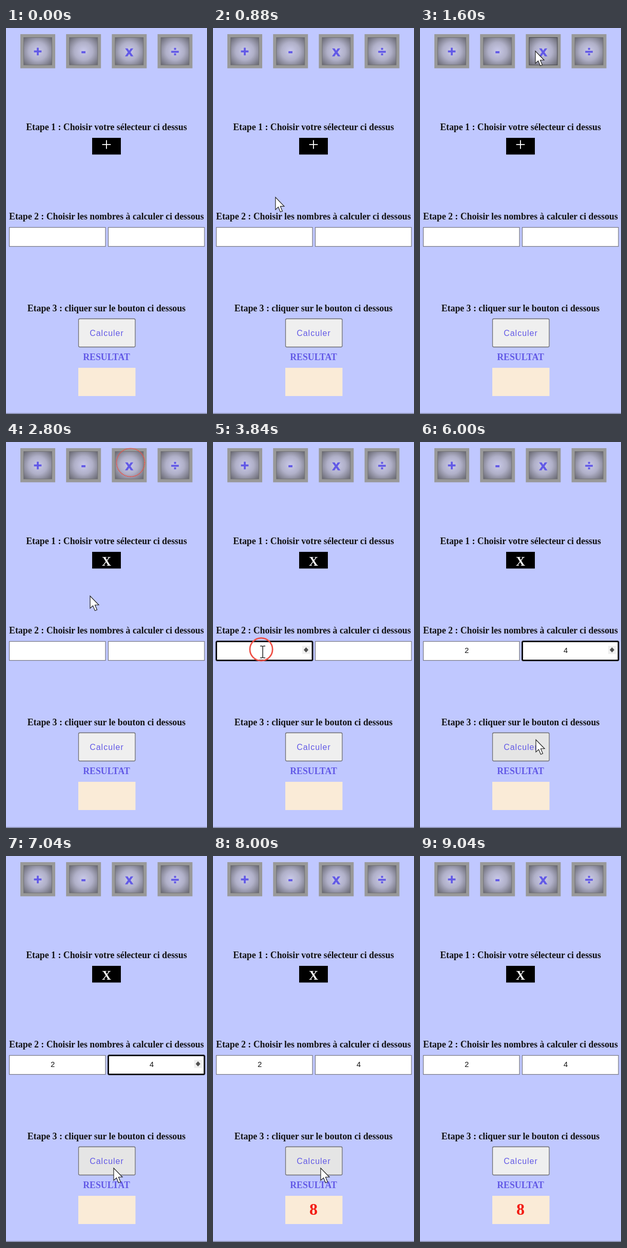
An HTML page that plays this animation: 392x752 px, repeating every 9.76 s.

```html
<!DOCTYPE html>
<html lang="fr">
<head>
<meta charset="utf-8">
<title>Calculatrice</title>
<style>
  html, body { margin: 0; width: 100%; height: 100%; overflow: hidden; background: #c0c8ff; }
  svg { display: block; }
  text { text-anchor: middle; }
  .step { font: bold 17.8px "Liberation Serif", serif; fill: #111; }
  .op { font: bold 28px "Liberation Sans", sans-serif; fill: #6259e6; stroke: #6259e6; stroke-width: .7; }
  .num { font: 14.8px "Liberation Sans", sans-serif; fill: #111; }
  .accent { fill: #6259e6; }
</style>
</head>
<body>
<svg width="392" height="752" viewBox="0 0 392 752">
  <defs>
    <radialGradient id="metal" r=".72">
      <stop offset="0" stop-color="#cacaea"/>
      <stop offset=".45" stop-color="#b0b0c8"/>
      <stop offset="1" stop-color="#62626a"/>
    </radialGradient>
  </defs>
  <rect width="392" height="752" fill="#c0c8ff"/>
  <path d="M0 751H392" stroke="#7b809c" stroke-width="1.5"/>
  <g id="keys"></g>

  <text class="step" x="196" y="199">Etape 1 : Choisir votre sélecteur ci dessus</text>
  <rect x="168" y="214" width="56" height="32.5"/>
  <text id="selector" x="196" fill="#fff"></text>

  <text class="step" x="196" y="373">Etape 2 : Choisir les nombres à calculer ci dessous</text>
  <g id="fields"></g>

  <text class="step" x="196" y="552">Etape 3 : cliquer sur le bouton ci dessous</text>
  <rect id="button" x="141.5" y="566.5" width="110.5" height="55" rx="2.5" stroke="#6d6d70" stroke-width="1.3"/>
  <text class="accent" x="196.5" y="600" style="font:16px 'Liberation Sans',sans-serif;letter-spacing:1px">Calculer</text>
  <text class="step accent" x="196" y="647" style="fill:#6259e6">RESULTAT</text>
  <rect x="141" y="662" width="111.5" height="55" fill="#faebd7"/>
  <text id="result" x="196" y="699" fill="#f3190f" style="font:bold 32px 'Liberation Serif',serif">8</text>

  <circle id="ring" fill="none" stroke="#ee4f45"/>
  <path id="arrow" d="M0 0V24L5.5 19L9.5 28.5L13.5 27L9.5 17.5H17Z" fill="#fff" stroke="#222" stroke-width="1.2"/>
  <path id="beam" d="M-5 -11.5H-1.5L0 -10.5L1.5 -11.5H5M0 -10.5V10.5M-5 11.5H-1.5L0 10.5L1.5 11.5H5" fill="none" stroke="#222" stroke-width="1.5"/>
</svg>
<script>
const LOOP = 9760, STEP = 80;
const $ = id => document.getElementById(id);
const show = (el, on) => el.style.display = on ? "" : "none";
const between = (t, a, b) => t >= a && t < b;

const set = (el, attrs) => {
  for (const name in attrs) el.setAttribute(name, attrs[name]);
};

$("keys").innerHTML = ["+", "-", "x", "÷"].map((sign, i) => `
  <g transform="translate(${28 + i * 89.2} 12)">
    <rect width="68" height="66.5" fill="#999"/>
    <rect class="face" x="6.5" y="6.5" width="55" height="53.5" fill="url(#metal)" stroke="#707074"/>
    <text class="op" x="34" y="43">${sign}</text>
  </g>`).join("");

$("fields").innerHTML = [6, 199].map((x, i) => `
  <g transform="translate(${x} 388)">
    <rect class="halo" x="-1" y="-1" width="190" height="40" rx="3" fill="#fff"/>
    <rect class="box" x=".5" y=".5" width="187.5" height="37" fill="#fff"/>
    <g class="spin"><path d="M168 9H183V25H168Z" fill="#efefef"/>
      <path d="M175.5 12L180 17L175.5 22L171 17Z" fill="#505050"/></g>
    <path class="caret" d="M85.5 10V26" stroke="#111" stroke-width="1.2"/>
    <text class="num" x="85" y="23">${[2, 4][i]}</text>
  </g>`).join("");

// Pointer path: time, x, y
const path = [
  [320, 60, 660], [1280, 166, 94], [1600, 225, 45], [1680, 225, 45], [1840, 242, 42],
  [2240, 242, 42], [2800, 164, 300], [3600, 96, 406], [3840, 97, 409], [4240, 97, 409],
  [4720, 293, 402], [5280, 293, 402], [6000, 226, 580], [6400, 210, 608],
  [8400, 210, 608], [8720, 252, 618], [9040, 252, 618]
];
// Clicks: start, end, x, y
const clicks = [[1760, 2880, 243, 40], [3760, 4160, 94, 404], [4720, 5040, 293, 402], [7440, 7920, 210, 608]];
// Fields: focus start, focus end, time of typing, hover start, hover end
const fields = [[3760, 4720, 4240, 3600, 4480], [4720, 7440, 5440, 4640, 5600]];

function pointer(t) {
  const i = path.findIndex(key => key[0] > t);
  const [t0, x0, y0] = path[i - 1], [t1, x1, y1] = path[i];
  const k = (t - t0) / (t1 - t0);
  return [x0 + (x1 - x0) * k, y0 + (y1 - y0) * k];
}

function draw(t) {
  const visible = between(t, 320, 9040);
  const [x, y] = visible ? pointer(t) : [-99, -99];
  const overField = y > 388 && y < 426 && (x < 194 || x > 199);
  show($("arrow"), visible && !overField);
  show($("beam"), visible && overField);
  for (const id of ["arrow", "beam"]) set($(id), { transform: `translate(${x} ${y})` });

  const hover = between(t, 1520, 2320);
  set(document.querySelectorAll(".face")[2], { stroke: hover ? "#44444a" : "#707074" });

  const chosen = t >= 1840;
  $("selector").textContent = chosen ? "X" : "+";
  $("selector").style.font = (chosen ? "bold 25px" : "36px") + " 'Liberation Serif',serif";
  set($("selector"), { y: chosen ? 240.5 : 239 });

  [...$("fields").children].forEach((field, i) => {
    const [focus, blur, typed, enter, leave] = fields[i];
    const part = name => field.querySelector(name);
    const focused = between(t, focus, blur);
    show(part(".halo"), focused);
    set(part(".box"), {
      stroke: focused ? "#101014" : "#767680",
      "stroke-width": focused ? 3 : 1.2,
      rx: focused ? 2 : 0
    });
    show(part(".spin"), focused || between(t, enter, leave));
    show(part(".caret"), between(t, focus + 160, typed));
    show(part("text"), t >= typed);
  });

  const over = visible && between(x, 141, 252) && between(y, 566, 622);
  set($("button"), { fill: over ? "#e5e5e5" : "#efefef" });
  show($("result"), t >= 7520);

  const click = clicks.find(([start, end]) => between(t, start, end));
  show($("ring"), click);
  if (click) {
    const age = t - click[0];
    set($("ring"), {
      cx: click[2], cy: click[3],
      r: Math.min(27.5, 20.5 + age / 50),
      "stroke-width": age < 320 ? 2.8 : 1.8,
      "stroke-dasharray": age < 320 ? "none" : "2 1"
    });
  }
}

function tick() {
  const t = performance.now() % LOOP;
  draw(Math.floor(t / STEP) * STEP);
  requestAnimationFrame(tick);
}
tick();
</script>
</body>
</html>
```
